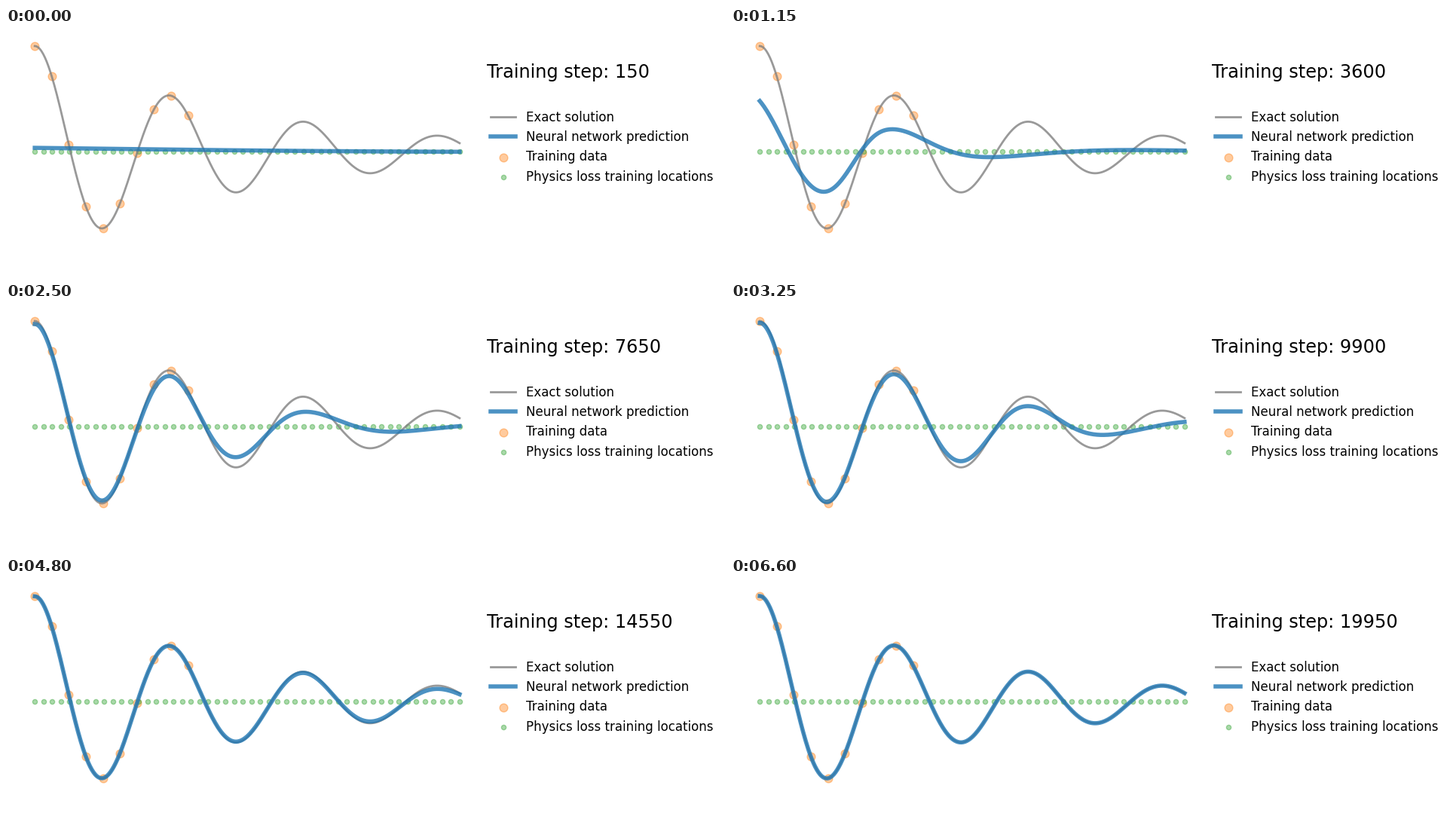
A matplotlib script that plays this animation: 954 by 328 pixels, repeating every 6650 ms.

```python
import numpy as np
import matplotlib.pyplot as plt
from matplotlib.animation import FuncAnimation

W, H, DPI = 954, 328, 100
FRAMES, INTERVAL, STEP = 133, 50, 150

# Damped oscillator: decay D, angular frequency OMEGA
D, OMEGA0 = 2, 20
OMEGA = np.sqrt(OMEGA0**2 - D**2)
x = np.linspace(0, 1, 500)


def hermite(t, knots, values):
    """Monotone cubic through knots; values may carry a trailing axis."""
    knots, values = np.asarray(knots, float), np.asarray(values, float)
    h = np.diff(knots).reshape((-1,) + (1,) * (values.ndim - 1))
    sec = np.diff(values, axis=0) / h
    slope = np.concatenate([sec[:1], sec])
    a, b = sec[:-1], sec[1:]
    same = a * b > 0
    slope[1:-1] = np.where(same, 2 * a * b / np.where(same, a + b, 1), 0)
    i = np.clip(np.searchsorted(knots, t, side="right") - 1, 0, len(knots) - 2)
    width = knots[i + 1] - knots[i]
    s = (t - knots[i]) / width
    return ((1 + 2 * s) * (1 - s)**2 * values[i]
            + s * (1 - s)**2 * width * slope[i]
            + s**2 * (3 - 2 * s) * values[i + 1]
            + s**2 * (s - 1) * width * slope[i + 1])


def wave(phase, log_amp):
    """Oscillation whose extrema fall where phase is a multiple of pi."""
    g = -np.gradient(log_amp, x) / np.maximum(np.gradient(phase, x), 1e-3)
    return np.exp(log_amp) * (np.cos(phase) + g * np.sin(phase))


# Training milestones: step, phase (in pi) at both ends,
# extremum positions in pixels, amplitudes at ends and extrema
STAGES = [
    (150, 0.2, 0.8, [], [.028, .007]),
    (2250, 0.2, 0.85, [], [.08, .004]),
    (3600, 0.17, 4.3, [123, 214, 343, 530],
     [.52, .382, .211, .0535, .014, .010]),
    (4350, 0.06, 4.9, [126, 215.5, 314, 435],
     [.86, .6, .36, .13, .04, .012]),
    (5700, 0, 5.45, [128, 217, 304, 406, 545],
     [.943, .671, .45, .239, .082, .032, .024]),
    (7200, 0, 5.6, [127.5, 216.5, 304.5, 399, 518],
     [.968, .698, .474, .282, .128, .045, .025]),
    (9900, 0, 5.85, [127, 216, 305, 394, 493],
     [.982, .714, .496, .329, .193, .08, .053]),
    (12600, 0, 6.28, [127, 216, 305, 394, 483, 574],
     [.993, .724, .521, .368, .25, .161, .086, .075]),
]

steps, phases, amps = [], [], []
for step, p0, p1, peaks, amp in STAGES:
    at = np.array([0, *[(p - 38.2) / 563.6 for p in peaks], 1])
    turns = [p0, *range(1, len(peaks) + 1), p1]
    steps.append(step)
    phases.append(hermite(x, at, np.pi * np.array(turns)))
    amps.append(hermite(x, at, np.log(amp)))
for step in (16800, 19950):
    steps.append(step)
    phases.append(OMEGA * x)
    amps.append(-D * x)


def prediction(step):
    return wave(hermite(step, steps, phases), hermite(step, steps, amps))


exact = np.exp(-D * x) * (np.cos(OMEGA * x) + D / OMEGA * np.sin(OMEGA * x))

plt.rcParams["font.family"] = "DejaVu Sans"
# The small surplus keeps the pixel size from being rounded down
fig = plt.figure(figsize=((W + 0.01) / DPI, (H + 0.01) / DPI), dpi=DPI,
                 facecolor="white")
ax = fig.add_axes([10 / W, 10 / H, 620 / W, 308 / H])
ax.set_xlim(-0.05, 1.05)
ax.set_ylim(-1.1, 1.1)
ax.axis("off")

ax.plot(x, exact, color="grey", lw=2, alpha=0.8, label="Exact solution")
line, = ax.plot(x, prediction(STEP), color="tab:blue", lw=4, alpha=0.8,
                label="Neural network prediction")
ax.scatter(x[:200:20], exact[:200:20], s=60, color="tab:orange", alpha=0.4,
           label="Training data")
ax.scatter(np.linspace(0, 1, 50), np.zeros(50), s=20, color="tab:green",
           alpha=0.4, label="Physics loss training locations")
ax.legend(loc=(1.01, 0.34), frameon=False, fontsize="large")
title = ax.text(1.065, 0.7, "", fontsize="xx-large", color="k")


def update(i):
    step = STEP * (i + 1)
    line.set_ydata(prediction(step))
    title.set_text(f"Training step: {step}")
    return line, title


anim = FuncAnimation(fig, update, frames=FRAMES, interval=INTERVAL,
                     init_func=lambda: update(0), repeat=True, repeat_delay=0)
plt.show()
```
